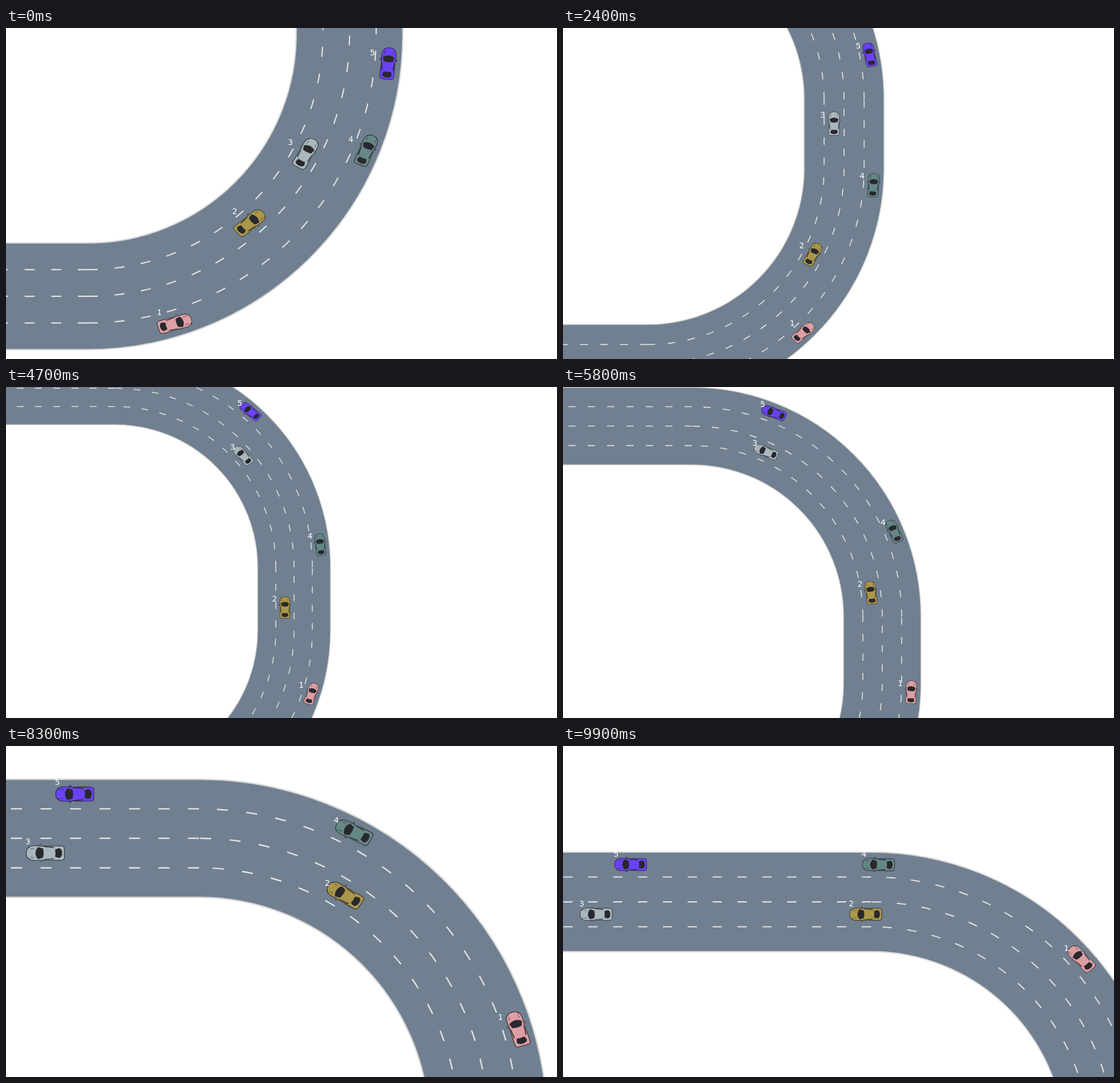
An HTML page without scripts that plays this animation: 966 by 580 pixels, repeating every 10000 ms.

```html
<!DOCTYPE html>
<html lang="en">
<head>
<meta charset="utf-8">
<title>Cars on a four-lane bend</title>
<style>
/* distance in metres that each car has driven along its lane */
@property --d1 { syntax: "<number>"; inherits: true; initial-value: 0 }
@property --d2 { syntax: "<number>"; inherits: true; initial-value: 0 }
@property --d3 { syntax: "<number>"; inherits: true; initial-value: 0 }
@property --d4 { syntax: "<number>"; inherits: true; initial-value: 0 }
@property --d5 { syntax: "<number>"; inherits: true; initial-value: 0 }

html, body { margin: 0; width: 100%; height: 100%; overflow: hidden; background: #fff }
svg { display: block; width: 966px; height: 580px; animation: drive 10s -4ms infinite }

@keyframes drive {
  0% { --d1: 10.59; --d2: 21.24; --d3: 31.97; --d4: 42.62; --d5: 53.39; animation-timing-function: steps(3) }
  3% { --d1: 12.1; --d2: 22.44; --d3: 33.63; --d4: 43.85; --d5: 55.06; animation-timing-function: steps(2) }
  5% { --d1: 13.38; --d2: 23.26; --d3: 35.11; --d4: 44.7; --d5: 56.6; animation-timing-function: steps(1) }
  7% { --d1: 14.07; --d2: 23.67; --d3: 35.94; --d4: 45.13; --d5: 57.46; animation-timing-function: steps(2) }
  9% { --d1: 15.51; --d2: 24.52; --d3: 37.71; --d4: 46; --d5: 59.29; animation-timing-function: steps(5) }
  14% { --d1: 19.5; --d2: 26.86; --d3: 42.7; --d4: 48.42; --d5: 64.31; animation-timing-function: steps(5) }
  19% { --d1: 23.5; --d2: 29.48; --d3: 48.2; --d4: 51.11; --d5: 69.62; animation-timing-function: steps(5) }
  24% { --d1: 27.48; --d2: 32.48; --d3: 53.92; --d4: 54.13; --d5: 75.05; animation-timing-function: steps(7) }
  31% { --d1: 33.2; --d2: 37.48; --d3: 61.9; --d4: 59.03; --d5: 82.6; animation-timing-function: steps(7) }
  38% { --d1: 38.9; --d2: 43.36; --d3: 70; --d4: 64.73; --d5: 90.2; animation-timing-function: steps(7) }
  45% { --d1: 44.75; --d2: 49.84; --d3: 78.1; --d4: 70.96; --d5: 97.8; animation-timing-function: steps(1) }
  47% { --d1: 45.58; --d2: 50.81; --d3: 79.25; --d4: 71.87; --d5: 98.88; animation-timing-function: steps(11) }
  58% { --d1: 55.4; --d2: 61.76; --d3: 92.05; --d4: 82.32; --d5: 110.9; animation-timing-function: steps(11) }
  69% { --d1: 65.55; --d2: 73.11; --d3: 104.9; --d4: 93.1; --d5: 122.9; animation-timing-function: steps(14) }
  83% { --d1: 78.76; --d2: 87.97; --d3: 121.3; --d4: 107.29; --d5: 138.2; animation-timing-function: steps(16) }
  99%, 100% { --d1: 94.26; --d2: 105.32; --d3: 140; --d4: 123.78; --d5: 155.67; animation-timing-function: steps(1) }
}

/* t: heading, x and y: place on the quarter bend, 11 m straight, quarter bend, straight */
.world {
  --t1: calc(clamp(0, var(--d1) / 36.2, pi / 2) + clamp(0, (var(--d1) - 67.86) / 36.2, pi / 2));
  --x1: calc(36.2 * sin(var(--t1)) - max(0, var(--d1) - 124.72));
  --y1: calc(36.2 * cos(var(--t1)) - clamp(0, var(--d1) - 56.86, 11));

  --t2: calc(clamp(0, var(--d2) / 29.8, pi / 2) + clamp(0, (var(--d2) - 57.81) / 29.8, pi / 2));
  --x2: calc(29.8 * sin(var(--t2)) - max(0, var(--d2) - 104.62));
  --y2: calc(29.8 * cos(var(--t2)) - clamp(0, var(--d2) - 46.81, 11));

  --t3: calc(clamp(0, var(--d3) / 29.8, pi / 2) + clamp(0, (var(--d3) - 57.81) / 29.8, pi / 2));
  --x3: calc(29.8 * sin(var(--t3)) - max(0, var(--d3) - 104.62));
  --y3: calc(29.8 * cos(var(--t3)) - clamp(0, var(--d3) - 46.81, 11));

  --t4: calc(clamp(0, var(--d4) / 36.2, pi / 2) + clamp(0, (var(--d4) - 67.86) / 36.2, pi / 2));
  --x4: calc(36.2 * sin(var(--t4)) - max(0, var(--d4) - 124.72));
  --y4: calc(36.2 * cos(var(--t4)) - clamp(0, var(--d4) - 56.86, 11));

  --t5: calc(clamp(0, var(--d5) / 36.2, pi / 2) + clamp(0, (var(--d5) - 67.86) / 36.2, pi / 2));
  --x5: calc(36.2 * sin(var(--t5)) - max(0, var(--d5) - 124.72));
  --y5: calc(36.2 * cos(var(--t5)) - clamp(0, var(--d5) - 56.86, 11));

  /* the camera frames all five cars with a fixed margin */
  --left: min(var(--x1), var(--x2), var(--x3), var(--x4), var(--x5));
  --right: max(var(--x1), var(--x2), var(--x3), var(--x4), var(--x5));
  --top: min(var(--y1), var(--y2), var(--y3), var(--y4), var(--y5));
  --low: max(var(--y1), var(--y2), var(--y3), var(--y4), var(--y5));
  --zoom: min(966 / (var(--right) - var(--left) + 8.52), 580 / (var(--low) - var(--top) + 8.52));
  transform: translate(483px, 290px) scale(var(--zoom))
    translate(calc(-.5px * (var(--left) + var(--right))), calc(-.5px * (var(--top) + var(--low))));
}

.road { fill: none; stroke: #708090; stroke-width: 12.65 }
.edge { fill: none; stroke: #d8d8d8; stroke-width: 12.96 }
.lines { fill: none; stroke: #e2e2e2; stroke-width: .15; stroke-dasharray: 1.2 2 }

.c1 { --x: var(--x1); --y: var(--y1); --t: var(--t1); color: #dd9ea4 }
.c2 { --x: var(--x2); --y: var(--y2); --t: var(--t2); color: #ab974a }
.c3 { --x: var(--x3); --y: var(--y3); --t: var(--t3); color: #a9b8bd }
.c4 { --x: var(--x4); --y: var(--y4); --t: var(--t4); color: #668787 }
.c5 { --x: var(--x5); --y: var(--y5); --t: var(--t5); color: #6a42f5 }
use {
  transform: translate(calc(1px * var(--x)), calc(1px * var(--y)))
    scale(1.045, .957) rotate(calc(-1rad * var(--t)));
}
text {
  font: 13.9px "DejaVu Sans", sans-serif;
  fill: #fff;
  text-anchor: middle;
  transform: translate(calc(1px * var(--x) - 2px), calc(1px * var(--y) - 1px)) scale(calc(1 / var(--zoom)));
}
</style>
</head>
<body>
<svg viewBox="0 0 966 580">
  <defs>
    <g id="car">
      <path d="M.36 -.78L.42 -1L.54 -.98L.56 -.78M.36 .78L.42 1L.54 .98L.56 .78" fill="currentColor" stroke="#222" stroke-width=".05"/>
      <path d="M-1.98 -.5Q-1.98 -.74 -1.75 -.8C-1 -.86 -.2 -.76 .4 -.8S1.4 -.88 1.7 -.66Q1.98 -.45 1.98 0Q1.98 .45 1.7 .66C1.4 .88 1 .84 .4 .8S-1 .86 -1.75 .8Q-1.98 .74 -1.98 .5Z" fill="currentColor" stroke="#222" stroke-width=".06"/>
      <g fill="#29292d">
        <path d="M.76 -.68Q1.28 0 .76 .68L.24 .52Q.1 0 .24 -.52Z"/>
        <path d="M-1.02 -.42Q-1.1 0 -1.02 .42L-1.45 .56Q-1.75 .45 -1.75 0T-1.45 -.56Z"/>
        <path d="M.3 .7L-.95 .58L-.8 .7L0 .74ZM.3 -.7L-.95 -.58L-.8 -.7L0 -.74Z"/>
        <path d="M1.6 .7L1.82 .46L1.82 .56L1.68 .7ZM1.6 -.7L1.82 -.46L1.82 -.56L1.68 -.7Z"/>
      </g>
      <path d="M1.1 .46L1.62 .54M1.16 .6L1.5 .42M1.1 -.46L1.62 -.54M1.16 -.6L1.5 -.42" fill="none" stroke="#222" stroke-width=".04" opacity=".55"/>
    </g>
  </defs>
  <g class="world">
    <path class="edge" d="M-90 31.4H0A31.4 31.4 0 0 0 31.4 0V-11A31.4 31.4 0 0 0 0 -42.4H-90"/>
    <path class="road" d="M-90 31.4H0A31.4 31.4 0 0 0 31.4 0V-11A31.4 31.4 0 0 0 0 -42.4H-90"/>
    <g class="lines">
      <path d="M0 28.2H-90M0 28.2A28.2 28.2 0 0 0 28.2 0V-11M28.2 -11A28.2 28.2 0 0 0 0 -39.2M0 -39.2H-90"/>
      <path d="M0 31.4H-90M0 31.4A31.4 31.4 0 0 0 31.4 0V-11M31.4 -11A31.4 31.4 0 0 0 0 -42.4M0 -42.4H-90"/>
      <path d="M0 34.6H-90M0 34.6A34.6 34.6 0 0 0 34.6 0V-11M34.6 -11A34.6 34.6 0 0 0 0 -45.6M0 -45.6H-90"/>
    </g>
    <g class="c1"><use href="#car"/><text x="2">1</text></g>
    <g class="c2"><use href="#car"/><text x="2">2</text></g>
    <g class="c3"><use href="#car"/><text x="2">3</text></g>
    <g class="c4"><use href="#car"/><text x="2">4</text></g>
    <g class="c5"><use href="#car"/><text x="2">5</text></g>
  </g>
</svg>
</body>
</html>
```
